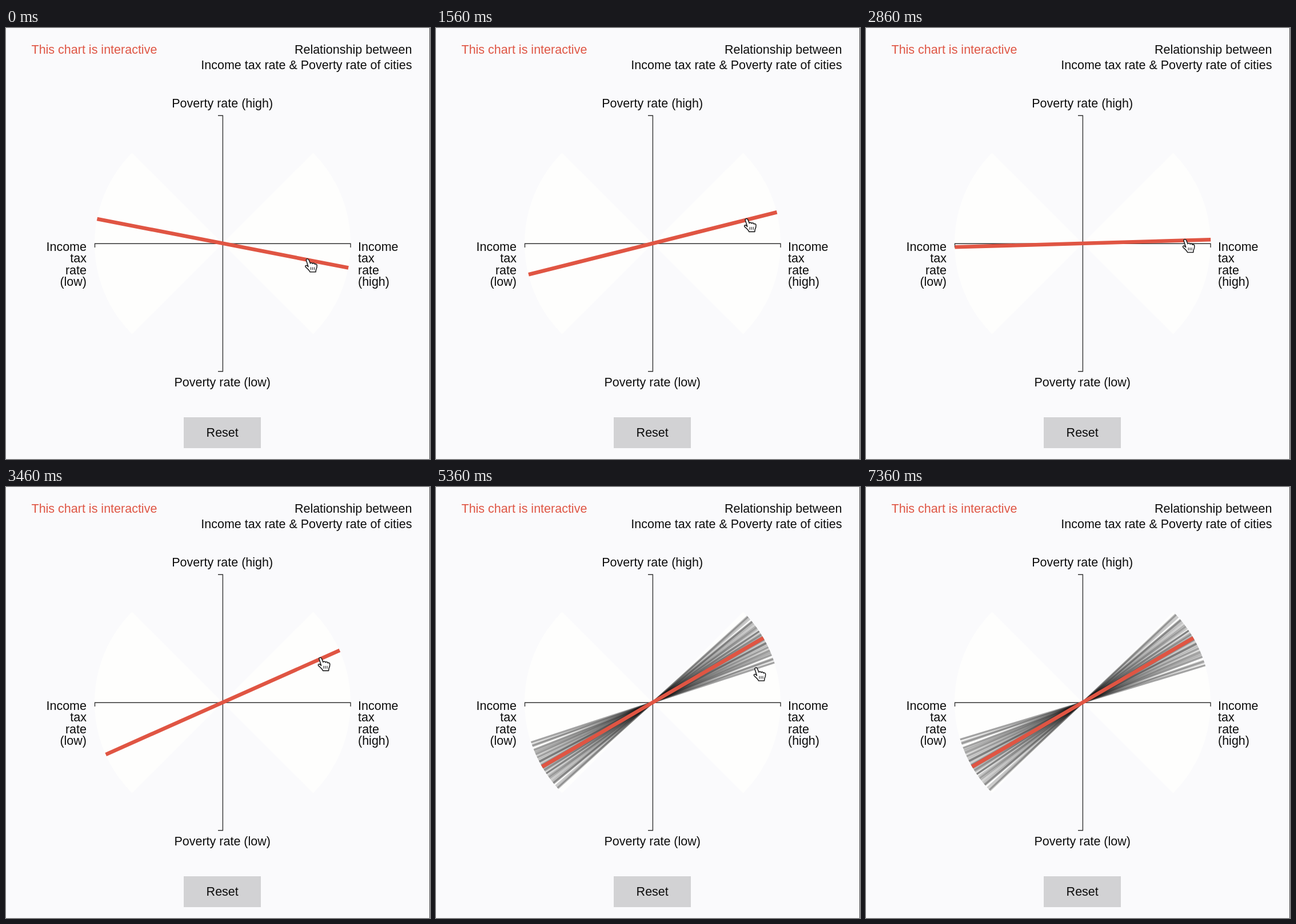
Recreate the animation shown at these times as an HTML page. Size 742 by 754 pixels, loop 7460 ms.

```html
<!DOCTYPE html>
<html lang="en">
<head>
<meta charset="utf-8">
<title>Income tax rate and poverty rate</title>
<style>
html, body { margin: 0; width: 100%; height: 100%; overflow: hidden; background: #fafafc; }
svg { display: block; width: 742px; height: 754px; }
text { font: 21.5px "Liberation Sans", Arial, sans-serif; fill: #0c0c0c; }
.mid { text-anchor: middle; }
.end { text-anchor: end; }
.note { fill: #df5645; }
.axis { fill: none; stroke: #333; stroke-width: 1.4; }
#rays line { stroke: #000; stroke-opacity: .2; stroke-width: 3.4; }
#trend { stroke: #e05543; stroke-width: 6.6; }
</style>
</head>
<body>
<svg viewBox="0 0 742 754">
  <rect width="742" height="754" fill="#fafafc"/>
  <path fill="#fefefd" d="M379 377 220.6 218.6A224 224 0 0 0 220.6 535.4ZM379 377 537.4 218.6A224 224 0 0 1 537.4 535.4Z"/>
  <path class="axis" d="M371 153.3H379.4V600.7H371M155.5 384V377.3H603V384"/>
  <g id="rays"></g>
  <line id="trend" x1="-224" x2="224"/>
  <text class="note" x="44.5" y="45">This chart is interactive</text>
  <text class="end" x="710.5" y="45">Relationship between</text>
  <text class="end" x="710.5" y="72">Income tax rate &amp; Poverty rate of cities</text>
  <text class="mid" x="378.7" y="139">Poverty rate (high)</text>
  <text class="mid" x="378.7" y="627">Poverty rate (low)</text>
  <text class="end"><tspan x="141" y="390">Income</tspan><tspan x="141" y="410.3">tax</tspan><tspan x="141" y="430.6">rate</tspan><tspan x="141" y="451">(low)</tspan></text>
  <text><tspan x="616" y="390">Income</tspan><tspan x="616" y="410.3">tax</tspan><tspan x="616" y="430.6">rate</tspan><tspan x="616" y="451">(high)</tspan></text>
  <rect x="311" y="681" width="135" height="54" fill="#d2d2d4"/>
  <text class="mid" x="378.7" y="715">Reset</text>
  <rect x="741" width="1" height="754" fill="#4a4a4c"/>
  <g id="hand" stroke="#222" stroke-width="1.6" stroke-linejoin="round" stroke-linecap="round">
    <path fill="#fff" d="M-3 1C-4-2 0-3 1.5 0L4 6C5 4.5 7.5 4.5 8 6.5C9.5 5 11.5 5.5 12 7.5C13.5 6.5 15.5 7.5 15.7 9.5C16 13 15.5 14 14 17L13.5 21H3.5C2.5 18 0 16-4 12.5C-6 10-3 8.5-1 10.5L.5 12Z"/>
    <path fill="none" stroke-width="1.1" d="M5 13V17M8 13V17M11 13V17"/>
  </g>
</svg>
<script>
const LOOP = 7460, CX = 379.3, CY = 376.8, ANSWER = 30.2;
const RELEASE = 3470, SPREAD = 4330, SPREAD_TIME = 1500, RAYS = 50;
const $ = id => document.getElementById(id);
const trend = $('trend'), rays = $('rays'), hand = $('hand');

// Smooth curve through [time, value] points without overshoot
function curve(points) {
  const slope = i => (points[i + 1][1] - points[i][1]) / (points[i + 1][0] - points[i][0]);
  const tangents = points.map((_, i) => {
    if (!i || i === points.length - 1) return 0;
    const a = slope(i - 1), b = slope(i);
    return a * b > 0 ? 2 * a * b / (a + b) : 0;
  });
  return t => {
    const last = points.length - 1;
    if (t <= points[0][0]) return points[0][1];
    if (t >= points[last][0]) return points[last][1];
    const i = points.findIndex(p => p[0] > t) - 1;
    const [t0, v0] = points[i], [t1, v1] = points[i + 1];
    const d = t1 - t0, u = (t - t0) / d, w = 1 - u;
    return v0 * (1 + 2 * u) * w * w + v1 * u * u * (3 - 2 * u)
      + d * u * w * (tangents[i] * w - tangents[i + 1] * u);
  };
}

const angle = curve([[0, -11], [640, 32], [780, 25], [900, 14.7], [1220, -18], [1820, 35.3],
  [2260, -8.1], [2450, -17], [3060, 13.5], [3300, 24], [RELEASE, 24], [3830, ANSWER]]);
const grip = curve([[0, 152], [900, 173], [2260, 167], [3300, 188]]);
const handX = curve([[SPREAD, 551], [4700, 553], [5360, 561], [5830, 560]]);
const handY = curve([[SPREAD, 300.5], [4700, 301], [5360, 318], [5830, 321]]);

let seed = 11;
const random = () => (seed = seed * 16807 % 2147483647) / 2147483647;

const fan = Array.from({ length: RAYS }, (_, i) => {
  const line = trend.cloneNode();
  line.removeAttribute('id');
  rays.append(line);
  const inner = i > 0 && i < RAYS - 1;
  const u = 2 * i / (RAYS - 1) - 1 + (inner ? (random() - .5) * .09 : 0);
  return { line, offset: 13.3 * Math.sign(u) * Math.abs(u) ** 1.3 };
});

const turn = (line, deg) =>
  line.setAttribute('transform', `translate(${CX} ${CY}) rotate(${-deg})`);

function handAt(t) {
  if (t >= 7330) return [705, 342];
  if (t >= 7300) return [620, 331];
  if (t >= RELEASE) return [handX(t), handY(t)];
  const a = angle(t) * Math.PI / 180, r = grip(t);
  return [CX + r * Math.cos(a), CY - r * Math.sin(a)];
}

function draw(t) {
  turn(trend, angle(t));
  const p = Math.min(1, Math.max(0, (t - SPREAD) / SPREAD_TIME));
  const eased = p * (2 - p);
  rays.style.display = p > 0 ? '' : 'none';
  for (const { line, offset } of fan) turn(line, ANSWER + offset * eased);
  hand.style.display = t < 7360 ? '' : 'none';
  hand.setAttribute('transform', `translate(${handAt(t).join(' ')})`);
}

const start = performance.now();
function tick() {
  draw((performance.now() - start) % LOOP);
  requestAnimationFrame(tick);
}
tick();
</script>
</body>
</html>
```
